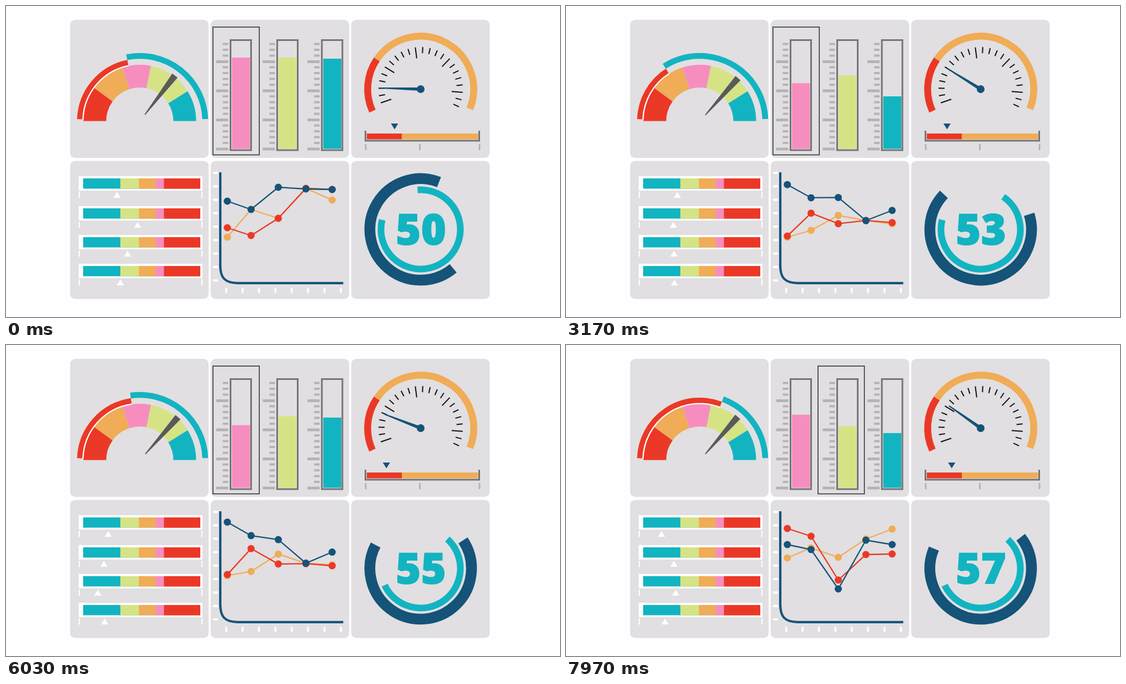
Recreate the animation shown at these times as an HTML page. Size 998 by 561 pixels, loop 8 s.

```html
<!DOCTYPE html>
<html lang="en">
<head>
<meta charset="utf-8">
<title>Dashboard gauges</title>
<style>
html, body { margin: 0; width: 100%; height: 100%; overflow: hidden; background: #fefdff; }
svg { display: block; width: 100vw; height: 100vh; }
text { font: 800 76px "Open Sans", Lato, sans-serif; letter-spacing: 1px; }
</style>
</head>
<body>
<svg id="stage" viewBox="0 0 998 561"></svg>
<script>
const LOOP = 8;
const RED = '#eb3826', ORANGE = '#f0ac56', PINK = '#f78dbf', GREEN = '#d6e385';
const TEAL = '#12b4c1', NAVY = '#155379', GRAY = '#757575', PALE = '#b5b3b5', PANEL = '#e1dfe1';
const stage = document.getElementById('stage');
const updates = [];

function add(tag, attrs) {
  const node = document.createElementNS('http://www.w3.org/2000/svg', tag);
  set(node, attrs);
  return stage.appendChild(node);
}
function set(node, attrs) {
  for (const key in attrs) node.setAttribute(key, attrs[key]);
}
const rect = (x, y, width, height, fill, more) => add('rect', { x, y, width, height, fill, ...more });
const path = (d, stroke, width) => add('path', { d, fill: 'none', stroke, 'stroke-width': width });
const shape = (d, fill) => add('path', { d, fill });

// Angles are in degrees, clockwise from the top.
function polar(cx, cy, r, deg) {
  const a = deg * Math.PI / 180;
  return [cx + r * Math.sin(a), cy - r * Math.cos(a)];
}
function arc(cx, cy, r, from, to) {
  const big = to - from > 180 ? 1 : 0;
  return `M${polar(cx, cy, r, from)}A${r} ${r} 0 ${big} 1 ${polar(cx, cy, r, to)}`;
}

// Straight motion from `from`, through [seconds, value] turning points.
function glide(t, from, ...turns) {
  let start = 0, value = from;
  for (const [end, next] of turns) {
    if (t < end) return value + (next - value) * (t - start) / (end - start);
    start = end;
    value = next;
  }
  return value;
}
function smooth(t, start, length) {
  const u = Math.min(1, Math.max(0, (t - start) / length));
  return u * u * (3 - 2 * u);
}

function panels() {
  for (let i = 0; i < 6; i++)
    rect(115.5 + i % 3 * 253.2, i < 3 ? 25 : 279.5, 249.5, 249, PANEL, { rx: 9 });
}

function segmentGauge() {
  const cx = 241, cy = 208;
  const stops = [-90, -54, -18, 11.5, 58, 90];
  [RED, ORANGE, PINK, GREEN, TEAL].forEach((color, i) =>
    path(arc(cx, cy - 0.5, 81, stops[i], stops[i + 1]), color, 41));
  const gap = path('', '#fff', 2.5), low = path('', RED, 9.5), high = path('', TEAL, 10.5);
  const needle = shape('M-.8-15L-6-104H6L.8-15Z', '#5a5a5a');
  updates.push(t => {
    const split = glide(t, -11.5, [4.25, -40], [6.8, 5.6], [LOOP, 21]);
    const dip = Math.max(0, Math.cos(2 * Math.PI * t / 4.23)) ** 8;
    set(gap, { d: arc(cx, cy, 102.5, -88, split) });
    set(low, { d: arc(cx, cy, 108.3, -88, split) });
    set(high, { d: arc(cx, cy, 118, split, Math.min(88, split + 125.5)) });
    set(needle, { transform: `translate(${cx} ${cy}) rotate(${41.5 - 4 * dip})` });
  });
}

function tube(x, color, level) {
  for (let i = 0; i < 19; i++) {
    const long = i % 5 === 3;
    rect(x - (long ? 24.5 : 12.5), 66.5 + i * 10.5, long ? 22 : 10, long ? 5 : 4, PALE);
  }
  rect(x + 1.5, 61.5, 37, 198.5, 'none', { stroke: GRAY, 'stroke-width': 3 });
  const liquid = rect(x + 4, 0, 32.5, 0, color);
  updates.push(t => set(liquid, { y: level(t), height: 257.5 - level(t) }));
}

function tubes() {
  tube(403, PINK, t => glide(t, 93, [4.25, 155], [5.4, 154], [6.8, 133], [LOOP, 125.5]));
  tube(487, GREEN, t => glide(t, 93, [2.3, 125], [5.6, 126], [6.8, 133], [LOOP, 147]));
  tube(567.5, TEAL, t => glide(t, 95, [1.2, 163], [2.4, 172], [6, 130], [6.8, 154], [LOOP, 159]));
  const focus = rect(0, 38, 83.5, 230.5, 'none', { stroke: '#2b2b2b', 'stroke-width': 1.5 });
  updates.push(t => set(focus, { x: t < 7.2 ? 372.8 : 454 }));
}

function dial() {
  const cx = 747, cy = 150;
  path(arc(cx, cy, 95.5, -114.5, -55.8), RED, 12.5);
  path(arc(cx, cy, 95.5, -55.8, 111.8), ORANGE, 12.5);
  for (let i = 0; i < 23; i++) {
    const a = -109 + i * 10.17;
    path(`M${polar(cx, cy, i % 5 ? 65 : 56, a)}L${polar(cx, cy, 76, a)}`, '#111', 2);
  }
  const needle = shape('M0-3L-70-1V1L0 3Z', NAVY);
  add('circle', { cx, cy, r: 7, fill: NAVY });
  rect(650, 230, 63, 10.5, RED);
  rect(713, 230, 137.5, 10.5, ORANGE);
  path('M647.5 225V243H852.5V225', GRAY, 3);
  for (const x of [648, 745.5, 853]) rect(x - 1.5, 249, 3, 11, PALE);
  const pointer = shape('M-6.5 212H6.5L0 222.5Z', NAVY);
  updates.push(t => {
    const angle = glide(t, 1.6, [2.4, 34.6], [6.2, 20.5], [LOOP, 35.5]);
    const spot = glide(t, 700, [2.4, 681.5], [4.2, 693], [6.1, 685], [LOOP, 695]);
    set(needle, { transform: `translate(${cx} ${cy}) rotate(${angle})` });
    set(pointer, { transform: `translate(${spot})` });
  });
}

function slider(y, spot) {
  rect(131, y, 223, 26, '#fff');
  // Each band covers what is left of the one before it.
  const bands = { [TEAL]: 139, [GREEN]: 206, [ORANGE]: 239.5, [PINK]: 269.5, [RED]: 284.5 };
  for (const color in bands) rect(bands[color], y + 4, 350 - bands[color], 18.5, color);
  for (const x of [131, 352]) rect(x, y + 28, 2, 11.5, '#fff');
  const marker = shape('M-6.5 39H6.5L0 28.5Z', '#fff');
  updates.push(t => set(marker, { transform: `translate(${spot(t)} ${y})` }));
}

function sliders() {
  slider(307, t => glide(t, 200, [1.2, 231], [2.4, 200], [4.2, 201.5], [6.8, 177], [LOOP, 172]));
  slider(361, t => glide(t, 237, [1.2, 206], [2.4, 190], [4.2, 198], [6.8, 167], [LOOP, 195]));
  slider(413, t => glide(t, 219, [1.2, 190], [2.4, 198], [4.2, 190], [6, 165], [LOOP, 198]));
  slider(465, t => glide(t, 206, [1.2, 190], [2.4, 205], [4.2, 182.5], [6, 177], [6.8, 196], [LOOP, 178]));
}

function series(color, ...poses) {
  const column = i => 399.5 + i * 47.2 - (i === 1 ? 5.2 : i === 2 ? 3.4 : 0.8);
  const line = path('', color, 2.3);
  const dots = poses[0].map((_, i) => add('circle', { cx: column(i), r: 6.5, fill: color }));
  updates.push(t => {
    const [a, b, c] = poses;
    const u = smooth(t, 1.53, 2.1), v = smooth(t, 5.8, 2.1);
    const ys = a.map((y, i) => y + (b[i] - y) * u + (c[i] - b[i]) * v);
    set(line, { d: 'M' + ys.map((y, i) => `${column(i)} ${y}`).join('L') });
    dots.forEach((dot, i) => set(dot, { cy: ys[i] }));
  });
}

function lineChart() {
  for (let i = 0; i < 9; i++) rect(373, 299 + i * 24.25, 9, 4, '#fff');
  for (let i = 0; i < 8; i++) rect(395 + i * 29.5, 508.5, 3.5, 9, '#fff');
  path('M386 300V468C386 490 394 499.8 418 499.8H607.5', NAVY, 4.2);
  series(ORANGE, [417, 367, 383, 329, 350], [417, 410, 377, 395, 399], [384, 366, 383, 350, 332]);
  series(RED, [400, 414, 383, 329, 331], [417, 368, 394, 395, 399], [331, 345, 424, 378, 377]);
  series(NAVY, [352, 367, 327, 330, 331], [318, 343, 348, 395, 374], [360, 369, 440, 352, 360]);
}

function rings() {
  const cx = 747, cy = 403;
  const outer = path('', NAVY, 19.5), inner = path('', TEAL, 12);
  const label = add('text', { x: cx + 1, y: 430, fill: TEAL, 'text-anchor': 'middle', stroke: TEAL, 'stroke-width': 2 });
  updates.push(t => {
    const turn = smooth(t, 0, 4.2), drift = Math.max(0, t - 4.2);
    const from = 140.2 - 79.5 * turn - 2.3 * drift;
    const start = -4.5 + 46 * turn + 0.4 * drift;
    set(outer, { d: arc(cx, cy, 91.5, from, from + 241) });
    set(inner, { d: arc(cx, cy, 71.5, start, 284 - 39 * smooth(t, 3.2, 2.8)) });
    label.textContent = 50 + Math.floor((t + 0.37) / 1.1);
  });
}

[panels, segmentGauge, tubes, dial, sliders, lineChart, rings].forEach(build => build());

const began = performance.now();
function draw() {
  const t = (performance.now() - began) / 1000 % LOOP;
  updates.forEach(update => update(t));
  requestAnimationFrame(draw);
}
draw();
</script>
</body>
</html>
```
